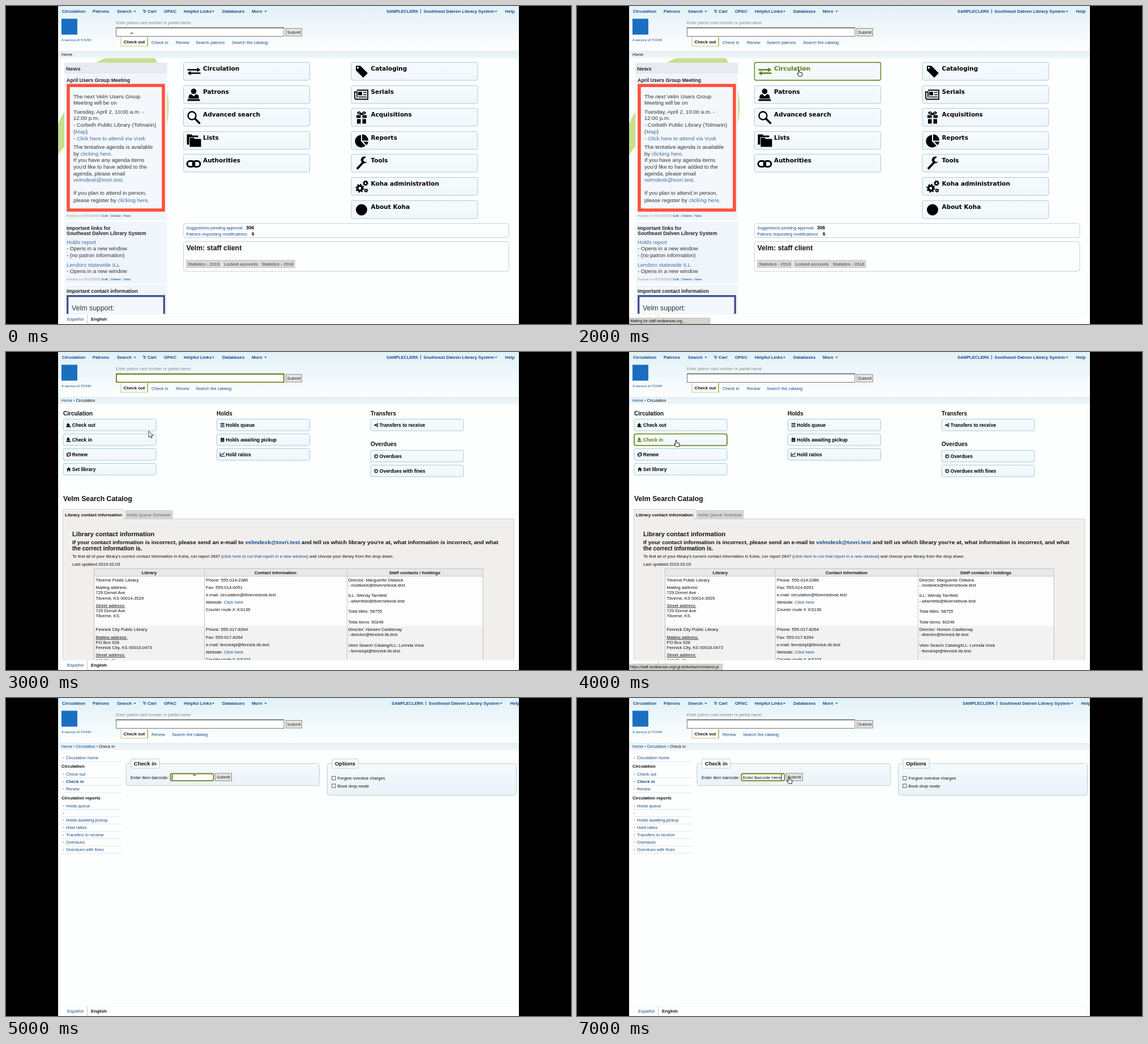
Write an HTML page that moves like this. It is 998 by 561 pixels and loops after 7.2 s.

```html
<!DOCTYPE html>
<html lang="en">
<head>
<meta charset="utf-8">
<title>Staff client: check in</title>
<style>
html, body { margin: 0; width: 100%; height: 100%; overflow: hidden; background: #000; }
svg { display: block; width: 100vw; height: 100vh; font-family: "Liberation Sans", Arial, sans-serif; }
.wide { font-family: "DejaVu Sans", Verdana, sans-serif; }
</style>
</head>
<body>
<svg id="stage" viewBox="0 0 998 561"></svg>
<script>
const LINK = '#164c8c', SOFT = '#416fa8', INK = '#111', GREEN = '#5f7f12';

// y is the middle of the capitals; [brackets] mark a link
function text(x, y, s, size, o = {}) {
  const body = s.replace(/\[(.*?)\]/g, `<tspan fill="${o.link || LINK}">$1</tspan>`);
  return `<text x="${x}" y="${(y + size * .36).toFixed(2)}" font-size="${size}" fill="${o.fill || INK}"` +
    `${o.bold ? ' font-weight="700"' : ''}${o.mid ? ' text-anchor="middle"' : ''}` +
    `${o.line ? ' text-decoration="underline"' : ''}${o.wide ? ' class="wide"' : ''}>${body}</text>`;
}
const bold = (x, y, s, size, o) => text(x, y, s, size, { bold: 1, ...o });
const link = (x, y, s, size, o) => text(x, y, s, size, { fill: LINK, ...o });
const lines = (x, size, rows, o) => rows.map(([y, s, more]) => text(x, y, s, size, { ...o, ...more })).join('');
const box = (x, y, x2, y2, fill, stroke = 'none', r = 0, w = 1) =>
  `<rect x="${x}" y="${y}" width="${x2 - x}" height="${y2 - y}" rx="${r}" fill="${fill}" stroke="${stroke}" stroke-width="${w}"/>`;
const rule = (x, y, x2, y2, c, w = 1) => `<path d="M${x} ${y}L${x2} ${y2}" stroke="${c}" stroke-width="${w}"/>`;
const caret = (x, y) => `<path d="M${x} ${y}h4l-2 2.3z" fill="${LINK}"/>`;
const group = (id, s) => `<g id="${id}">${s}</g>`;
const at = (x, y, s, color = '#000', scale = 1) =>
  `<g transform="translate(${x} ${y}) scale(${scale})" fill="${color}" stroke="none" color="${color}">${s}</g>`;
const fillPath = d => `<path d="${d}"/>`;
const linePath = (d, w = 1) => `<path d="${d}" fill="none" stroke="currentColor" stroke-width="${w}"/>`;

function gear(x, y, r) {
  const ring = `<circle cx="${x}" cy="${y}" r="${r * .6}" fill="none" stroke="currentColor" stroke-width="${r * .5}"/>`;
  return ring + `<circle cx="${x}" cy="${y}" r="${r * .9}" fill="none" stroke="currentColor" stroke-width="${r * .4}" stroke-dasharray="${r * .35}"/>`;
}

// Icons are drawn around 0,0
const icons = {
  swap: fillPath('M-11-4.2H6V-7L12-3 6 1V-1.8H-11zM12 1.8H-5V-1L-11 3-5 7V4.2H12z'),
  people: '<circle cy="-6" r="4.8"/>' + fillPath('M-9 7Q-10-1-4-1L0 3 4-1Q10-1 9 7zM-11 8H11V11H-11z'),
  search: '<circle cx="-3" cy="-3" r="7" fill="none" stroke="currentColor" stroke-width="2.4"/>' + linePath('M2 2L11 11', 3.6),
  folder: fillPath('M-12-11H-4L-2-9H8V-6H-8V7H-12z') + fillPath('M-7-5H0L2-3H13V11H-7z'),
  chain: '<g fill="none" stroke="currentColor" stroke-width="3"><rect x="-11.5" y="-4" width="13" height="10" rx="5"/><rect x="-1.5" y="-4" width="13" height="10" rx="5"/></g>',
  tag: fillPath('M-10-10H-2L11 3 3 11-10-2z') + '<circle cx="-6.5" cy="-6.5" r="1.8" fill="#eef6fa"/>',
  paper: linePath('M-8-8H11V8H-9Q-12 8-12 5V-5H-8V5', 1.8) + linePath('M3-4H9M3 0H9M-6 4H9', 1.6) + fillPath('M-6-5H1V1H-6z'),
  gift: fillPath('M-9-4H-1.5V1H-9zM1.5-4H9V1H1.5zM-8 3H-1.5V11H-8zM1.5 3H8V11H1.5z') +
    linePath('M0-5Q-3-11-6-9T0-5Q3-11 6-9T0-5', 2),
  pie: fillPath('M-1-10V1L7 9A11 11 0 1 1-1-10z') + fillPath('M1-11A11 11 0 0 1 12 0H1z') + fillPath('M3 2H12A11 11 0 0 1 9 8z'),
  wrench: linePath('M-8 10L4-3', 4) + fillPath('M8-11A6 6 0 1 0 10-3L6-2 3-5 4-8z'),
  gears: gear(-3, 3, 7) + gear(7, -6, 4.5) + gear(8, 7, 3.2),
  disc: '<circle r="10"/>',
  up: fillPath('M-1-4L3 0H1V2H-3V0H-5zM-5 2H4V4H-5z'),
  down: fillPath('M-3-4H1V-1H3L-1 2-5-1H-3zM-5 2H4V4H-5z'),
  loop: linePath('M-3-1V3H2M3 1V-3H-2', 1.5) + fillPath('M-5 0L-3-3-1 0zM1 0H5L3 3z'),
  home: fillPath('M-4 0L0-4 4 0H3V4H1V1H-1V4H-3V0z'),
  bars: linePath('M-4-3H4M-4 0H4M-4 3H4', 1.6),
  dates: fillPath('M-3.5-3H3.5V4H-3.5z') + linePath('M-2-4.5V-2M2-4.5V-2', 1.2) +
    '<path d="M-2.5 0H2.5M-2.5 2H2.5" stroke="#eef6fa" stroke-dasharray="1.2 .7"/>',
  chart: linePath('M-4.5-4V3.5H5M-3 2L-1-1 1 0 4-4', 1.2),
  enter: fillPath('M-4-1H-1V-3L2 0-1 3V1H-4z') + linePath('M1-3H3V3H1', 1.2),
  clock: '<circle r="3.2" fill="none" stroke="currentColor" stroke-width="1.2"/>' + linePath('M0-2V0H-2', 1),
  cart: linePath('M-3-3H-1.5L-.5 1H3L3.5-2H-1', 1.2) + '<circle cx="-.2" cy="3" r=".9"/><circle cx="2.6" cy="3" r=".9"/>'
};

const menuTile = (x, row, name, icon, hot) => {
  const y = Math.round(99 + row * 40.6) + .5, c = hot ? GREEN : '#000';
  return box(x, y, x + 223, y + 31.5, 'url(#tile)', hot ? GREEN : '#a9cbd8', 3, hot ? 1.4 : 1) +
    at(x + 18, y + 16, icons[icon], c) + bold(x + 34.5, y + 11, name, 10.5, { wide: 1, fill: c });
};
const smallTile = (x, y, name, icon, hot) => {
  const c = hot ? GREEN : '#000';
  return box(x, y, x + 164, y + 20.5, 'url(#tile)', hot ? GREEN : '#a3cbd9', 3, hot ? 1.6 : 1) +
    at(x + 9.8, y + 10.4, icons[icon], c, .9) + bold(x + 15.8, y + 10.4, name, 8.5, { fill: c });
};
const button = (x, y, x2, y2) => box(x, y, x2, y2, '#e6e6e4', '#8a8a8a') +
  text((x + x2) / 2, (y + y2) / 2 + .2, 'Submit', 7.7, { mid: 1, fill: '#222' });
const focusBox = (x, y, x2, y2) => box(x, y, x2, y2, '#fff', '#6c8420', 2, 1.8);
const tabs = (...items) => items.map(([x, s]) => link(x, 64, s, 7.6)).join('');
const account = dx => bold(672 + dx, 9, 'SAMPLECLERK', 7.4, { fill: LINK }) + rule(732.5 + dx, 5.5, 732.5 + dx, 13, LINK, .9) +
  bold(737.5 + dx, 9, 'Southeast Dalven Library System', 7.85, { fill: LINK }) + caret(863.5 + dx, 8.6) +
  bold(881.5 + dx, 9, 'Help', 7.85, { fill: LINK });

const header = box(92, 0, 906, 561, '#fdfefe') + box(92, 0, 906, 79, 'url(#sky)') + box(92, 79, 906, 92, 'url(#crumb)') +
  [[99, 'Circulation'], [153, 'Patrons'], [196, 'Search'], [250, 'Cart'], [279, 'OPAC'], [314, 'Helpful Links'], [382, 'Databases'], [434, 'More']]
    .map(([x, s]) => bold(x, 9, s, 7.85, { fill: LINK })).join('') +
  [225.5, 364, 456.5].map(x => caret(x, 8.6)).join('') + at(244, 9, icons.cart, LINK, .75) +
  box(98, 22.5, 126, 50.5, '#1b6fc0') + link(98, 59.5, 'A service of TOVRI', 6.2) +
  text(194, 29.5, 'Enter patron card number or partial name:', 7.2, { fill: '#888' }) +
  box(194.5, 38.5, 491, 53.5, '#fff', '#777') + rule(194, 38.5, 491, 38.5, '#555', 1.4) +
  button(494.5, 39.5, 522.5, 53) +
  `<path d="M203 55V71H250V55" fill="#fff" stroke="#c0c878"/>` + rule(250, 55, 250, 71, '#98a53a', 1.2) +
  bold(207.5, 62.8, 'Check out', 7.86);

const mail = 'velmdesk@tovri.test';
const posted = (y, date) => text(107, y, `Posted on ${date} [Edit] | [Delete] | [New]`, 6.2, { fill: '#999' });

const leftTiles = [['Circulation', 'swap'], ['Patrons', 'people'], ['Advanced search', 'search'], ['Lists', 'folder'], ['Authorities', 'chain']];
const rightTiles = [['Cataloging', 'tag'], ['Serials', 'paper'], ['Acquisitions', 'gift'], ['Reports', 'pie'], ['Tools', 'wrench'],
  ['Koha administration', 'gears'], ['About Koha', 'disc']];

const homePage = tabs([257, 'Check in'], [300, 'Renew'], [335, 'Search patrons'], [399, 'Search the catalog']) + account(0) +
  text(98, 85, 'Home', 7.2) +
  `<path d="M158 101Q166 95 176 92H263A166 166 0 0 1 284 212L250 248H104Q97 254 92 263V209Q96 196 104 186z" fill="#c8df8c"/>` +
  box(103, 100, 284.5, 543, '#f0f5fb') + box(103, 100, 284.5, 120, '#e7ebf1') +
  [[377.5, 381], [489.5, 492.5]].map(([a, b]) => box(103, a, 284.5, b, '#fdfefe')).join('') +
  rule(103, 120.5, 284, 120.5, '#fafcfe') + rule(105, 120, 105, 543, '#fafcfe', 1.5) +
  bold(106, 110, 'News', 9.8, { fill: '#333' }) + bold(107, 130.5, 'April Users Group Meeting', 8.85, { fill: '#222' }) +
  box(110, 140.2, 278, 360, '#f4f8fc', '#ff523d', 0, 5.6) +
  lines(119, 9.6, [[159.5, 'The next Velm Users Group'], [171, 'Meeting will be on'], [187, 'Tuesday, April 2, 10:00 a.m. -'], [198, '12:00 p.m.'],
    [210, '- Corbeth Public Library (Tolmarin)'], [221.5, '([Map])'], [233.5, '- [Click here to attend via Vusk]'],
    [249, 'The tentative agenda is available'], [260.5, 'by [clicking here].'], [272, 'If you have any agenda items'],
    [284, "you'd like to have added to the"], [296, 'agenda, please email'], [307, `[${mail}].`],
    [330, 'If you plan to attend in person,'], [342.5, 'please register by [clicking here].']], { fill: '#333', link: SOFT }) +
  posted(369.8, '03/19/2019') +
  bold(107, 391.5, 'Important links for', 8.85, { fill: '#222' }) + bold(107, 400.8, 'Southeast Dalven Library System', 8.85, { fill: '#222' }) +
  lines(107, 9.55, [[416.5, '[Holds report]'], [428, '- Opens in a new window'], [440, '- (no patron information)'],
    [456.5, '[Lendoro statewide ILL]'], [468, '- Opens in a new window']], { fill: '#333', link: SOFT }) +
  posted(481.5, '03/25/2019') +
  bold(107, 503, 'Important contact information', 8.85, { fill: '#222' }) +
  box(108.7, 511.7, 279.3, 560, '#f4f8fc', '#46508f', 0, 3.4) + text(116, 533, 'Velm support:', 12.4, { fill: '#333' }) +
  leftTiles.map((t, i) => menuTile(313.5, i, ...t)).join('') + rightTiles.map((t, i) => menuTile(610, i, ...t)).join('') +
  box(313.5, 383.7, 888, 408.5, '#fdfefe', '#c3d0d6', 4) + box(313.5, 415.5, 888, 468, '#fdfefe', '#c3d0d6', 4) +
  link(318.5, 391, 'Suggestions pending approval:', 7.36) + bold(424, 391, '306', 8.6) +
  link(318.5, 402, 'Patrons requesting modifications:', 7.36) + bold(434, 402, '6', 8.2) +
  bold(318.5, 427, 'Velm: staff client', 12.3) +
  [[318.5, 380, 'Statistics - 2019'], [383, 447, 'Locked accounts'], [449, 510, 'Statistics - 2018']]
    .map(([x, x2, s]) => box(x, 448.5, x2, 461.5, '#d9d7d8', '#c6c4c5') + text((x + x2) / 2, 455.3, s, 7.9, { mid: 1, fill: '#444' })).join('');

const circPage = tabs([257, 'Check in'], [300, 'Renew'], [335, 'Search the catalog']) + account(0) +
  text(98, 85, '[Home] › Circulation', 7.2) +
  [[101, 108, 'Circulation'], [372, 108, 'Holds'], [644, 108, 'Transfers'], [644, 162.5, 'Overdues']].map(([x, y, s]) => bold(x, y, s, 10)).join('') +
  [[101, 118.5, 'Check out', 'up'], [101, 144.5, 'Check in', 'down'], [101, 170.5, 'Renew', 'loop'], [101, 196.5, 'Set library', 'home'],
    [372.5, 118.5, 'Holds queue', 'bars'], [372.5, 144.5, 'Holds awaiting pickup', 'dates'], [372.5, 170.5, 'Hold ratios', 'chart'],
    [644, 118.5, 'Transfers to receive', 'enter'], [644, 173.5, 'Overdues', 'clock'], [644, 199.5, 'Overdues with fines', 'clock']]
    .map(b => smallTile(...b)).join('') +
  bold(101, 258.3, 'Velm Search Catalog', 12.3) +
  box(100.5, 294.5, 897, 580, '#f1efee', '#cfd0d0') + box(211, 279.5, 294, 293.5, '#d8d7d7', '#cfcfcf') +
  `<path d="M100.5 296V277.5H208V296" fill="#f1efee" stroke="#cfd0d0"/>` +
  bold(104, 287.3, 'Library contact information', 7.77) + text(213, 287.3, 'Holds Queue Schedule', 7.6, { fill: '#666' }) +
  bold(117, 320.5, 'Library contact information', 11.2) +
  bold(117, 335.8, `If your contact information is incorrect, please send an e-mail to [${mail}] and tell us which library you're at, what information is incorrect, and what`, 9.95) +
  bold(117, 346.3, 'the correct information is.', 10) +
  text(117, 360.5, "To find all of your library's current contact information in Koha, run report 2847 ([click here to run that report in a new window]) and choose your library from the drop down.", 7.6) +
  text(117, 373.8, 'Last updated 2019.02.03', 7.65) +
  box(155.5, 382, 842.5, 395, '#e8e8e8') + box(155.5, 395, 842.5, 483.5, '#fdfdfd') + box(155.5, 483.5, 842.5, 560, '#f3f2f2') +
  box(155.5, 382, 842.5, 580, 'none', '#bfbfbf') + rule(155, 395.5, 843, 395.5, '#c6c6c6') +
  rule(350.5, 382, 350.5, 560, '#c6c6c6') + rule(602.5, 382, 602.5, 560, '#c6c6c6') +
  [[253, 'Library'], [476, 'Contact information'], [722, 'Staff contacts / holdings']].map(([x, s]) => bold(x, 388.8, s, 7.8, { mid: 1 })).join('') +
  lines(158.5, 7.7, [[402, 'Tilverne Public Library'], [415, 'Mailing address:'], [424.5, '729 Dorvel Ave'], [434, 'Tilverne, KS 00014-3529'],
    [447, 'Street address:', { line: 1 }], [456, '729 Dorvel Ave'], [465.5, 'Tilverne, KS'],
    [489.7, 'Fennick City Public Library'], [503, 'Mailing address:', { line: 1 }], [512, 'PO Box 928'], [521.3, 'Fennick City, KS 00016-0473'],
    [534.5, 'Street address:', { line: 1 }], [544, '640 5th St']]) +
  lines(353, 7.7, [[402, 'Phone: 555-014-2386'], [415, 'Fax: 555-014-6051'], [428, 'e-mail: circulation@tilvernebook.test'], [441.5, 'Website: [Click here]'],
    [454.3, 'Courier route #: KS136'], [489.7, 'Phone: 555-017-8264'], [503, 'Fax: 555-017-8264'], [516, 'e-mail: fennickpl@fennick.lib.test'],
    [529, 'Website: [Click here]'], [542, 'Courier route #: KS103']]) +
  lines(604.5, 7.7, [[402, 'Director: Marguerite Oldwick'], [411, '- moldwick@tilvernebook.test'], [429.7, 'ILL: Wendy Tarnfeld'], [439.3, '- wtarnfeld@tilvernebook.test'],
    [457.5, 'Total titles: 58755'], [476.3, 'Total items: 60246'], [489.7, 'Director: Noreen Castlemay'], [498.5, '- director@fennick.lib.test'],
    [517.3, 'Velm Search Catalog/ILL: Lorinda Vosk'], [526.8, '- fennickpl@fennick.lib.test'], [545.5, 'Total titles: 32108']]);

const fieldset = (x, x2, y2, lx, lx2, name) => box(x, 115.5, x2, y2, 'url(#panel)', '#b5cfd9', 4) +
  box(lx, 107.5, lx2, 124, '#fdfefe', '#b5cfd9', 2) + bold((lx + lx2) / 2, 115.7, name, 9.6, { mid: 1 });
const side = [[105.5, 'Circulation home'], [134.5, 'Check out'], [147.5, 'Check in', 1], [160.5, 'Renew'], [190, 'Holds queue'], [203, ''],
  [215.7, 'Holds awaiting pickup'], [228.7, 'Hold ratios'], [241.6, 'Transfers to receive'], [254.6, 'Overdues'], [267.4, 'Overdues with fines']];

const checkinPage = tabs([257, 'Renew'], [293, 'Search the catalog']) + account(9) +
  text(98, 85, '[Home] › [Circulation] › Check in', 7.2) +
  side.map(([y, s, on]) => link(106, y, s, 7.6, { bold: on }) + text(100, y, '›', 7.6, { fill: '#666' }) + rule(98, y + 6.5, 204, y + 6.5, '#e4e6e6')).join('') +
  bold(98, 120.3, 'Circulation', 7.8) + bold(98, 175.8, 'Circulation reports', 7.7) +
  fieldset(212, 553.5, 154.5, 220.5, 271, 'Check in') + fieldset(567.5, 901.5, 171.5, 576, 622, 'Options') +
  text(220, 140, 'Enter item barcode:', 7.7) + focusBox(290.5, 133.5, 366.5, 145.8) + button(369.5, 133, 398.5, 146) +
  [[141.5, 'Forgive overdue charges'], [155, 'Book drop mode']]
    .map(([y, s]) => box(575.8, y - 3.2, 582, y + 3, '#fff', '#555') + text(585.5, y, s, 7.6)).join('');

const footer = box(92, 543, 906, 561, '#fdfefe') + rule(92, 543.5, 906, 543.5, '#eef2f4') + rule(143.5, 544, 143.5, 561, '#c9c9c9') +
  link(108, 552, 'Español', 8) + bold(150, 552, 'English', 7.75);

const status = (id, x2, s) => group(id, box(92, 550.5, x2, 561, '#d6d3cd', '#b9b6b0', 1, .8) + text(94, 556, s, 6.55));
const address = 'https://staff.nextkansas.org/cgi-bin/koha/circ/';

const shade = (id, a, b) => `<linearGradient id="${id}" x2="0" y2="1"><stop stop-color="${a}"/><stop offset="1" stop-color="${b}"/></linearGradient>`;

document.getElementById('stage').innerHTML =
  '<defs>' + shade('sky', '#e2f1f8', '#fdfefe') + shade('crumb', '#e4f0f5', '#eff6f9') +
  shade('tile', '#f6fbfd', '#f0f7fb') + shade('panel', '#f5fafc', '#eaf3f8') +
  '<clipPath id="page"><rect x="92" width="814" height="561"/></clipPath></defs><g clip-path="url(#page)">' + header +
  group('home', homePage) + group('circ', circPage) + group('checkin', checkinPage) + footer +
  group('hotMenu', menuTile(313.5, 0, 'Circulation', 'swap', true)) +
  group('hotCheck', smallTile(101, 144.5, 'Check in', 'down', true)) +
  group('focus', focusBox(195, 39, 490.8, 53.3)) + group('searchCaret', rule(197.5, 41, 197.5, 51, '#000')) +
  group('typed', text(293, 140, 'Enter Barcode Here', 7.6)) +
  group('startCaret', rule(293.5, 135, 293.5, 144.5, '#000')) + group('endCaret', rule(361, 135, 361, 144.5, '#000')) +
  status('toCirc', 282, address + 'circulation-home.pl') + status('waiting', 235, 'Waiting for staff.nextkansas.org...') +
  status('toReturns', 257, address + 'returns.pl') +
  '<g id="pointer">' + group('beam', rule(-2.5, 0, 2.5, 0, '#222', 1.2)) +
  group('arrow', '<path d="M0 0V11L2.6 8.6 4.3 12.4 6 11.6 4.4 8H8z" fill="#fff" stroke="#000" stroke-width=".8"/>') +
  group('hand', '<path d="M-1 1Q0-.5 1 1V5L6 6V9L5 12H0L-3 8-2.6 6.5-1 8z" fill="#fff" stroke="#000" stroke-width=".9"/>') +
  '</g></g>';

// Visible spans in ms
const spans = {
  home: [[0, 2200]], circ: [[2200, 4400]], checkin: [[4400, 7200]],
  hotMenu: [[800, 2200]], hotCheck: [[3400, 4400]],
  toCirc: [[800, 1400]], waiting: [[1400, 2200], [4200, 4400]], toReturns: [[3400, 4200]],
  focus: [[2200, 3800]], searchCaret: [[2200, 2800], [3200, 3800]],
  startCaret: [[4400, 4600], [5000, 5600]], typed: [[6000, 7200]], endCaret: [[6000, 6600], [7000, 7200]],
  beam: [[0, 400], [2200, 2400], [4600, 6200]],
  arrow: [[400, 800], [2400, 3400], [4400, 4600], [6200, 6600]],
  hand: [[800, 2200], [3400, 4400], [6600, 7200]]
};
// Pointer stops: time, x, y
const stops = [[0, 222, 48], [800, 392, 112], [2000, 392, 112], [2200, 394, 111], [2400, 394, 111], [3400, 175, 155],
  [4400, 175, 155], [4600, 333, 136], [6000, 333, 136], [6600, 374, 139], [7200, 374, 139]];
const LOOP = 7200, STEP = 200;
const parts = Object.entries(spans).map(([id, list]) => [document.getElementById(id), list]);
const pointer = document.getElementById('pointer');

function draw(now) {
  const t = Math.floor((now % LOOP) / STEP) * STEP;
  for (const [el, list] of parts) el.style.display = list.some(([a, b]) => t >= a && t < b) ? '' : 'none';
  const i = stops.findIndex(s => s[0] > t), [t0, x0, y0] = stops[i - 1], [t1, x1, y1] = stops[i];
  const k = (t - t0) / (t1 - t0), e = k * k * (3 - 2 * k);
  pointer.setAttribute('transform', `translate(${x0 + (x1 - x0) * e} ${y0 + (y1 - y0) * e})`);
}
const start = performance.now();
function tick() {
  draw(performance.now() - start);
  requestAnimationFrame(tick);
}
tick();
</script>
</body>
</html>
```
